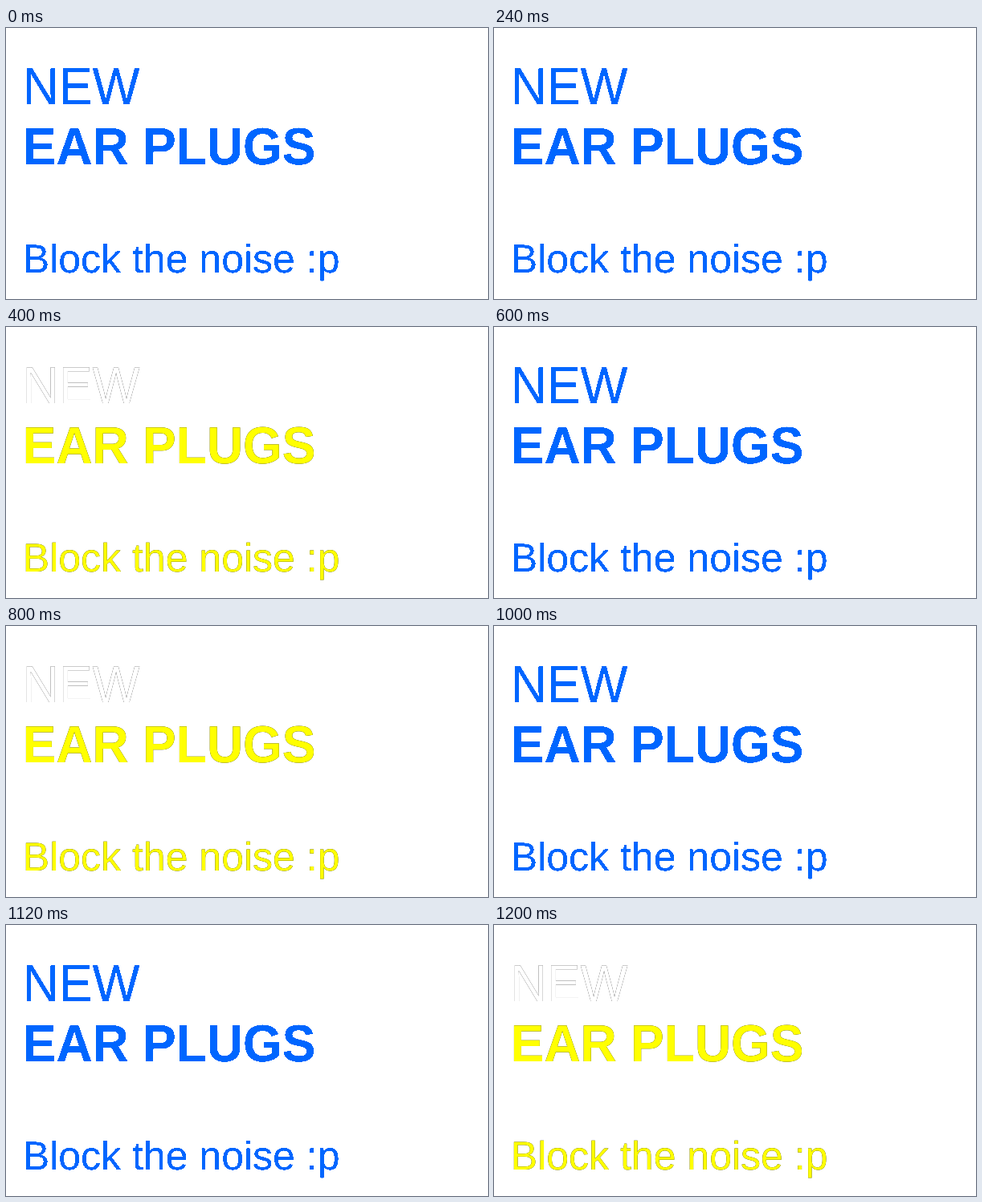
Recreate the animation shown at these times as an HTML page. Size 600x338 px, loop 1400 ms.

```html
<!DOCTYPE html>
<html lang="en">
<head>
<meta charset="utf-8">
<title>Ear plugs</title>
<style>
  html, body { margin: 0; width: 100%; height: 100%; overflow: hidden; background: #fff; }
  svg { display: block; }
  text {
    font-family: "Liberation Sans", Arial, sans-serif;
    font-kerning: none;
    text-rendering: geometricPrecision;
    fill: var(--copy);
  }
  .big { font-size: 62.5px; }
  .bold { font-weight: bold; }
  .small { font-size: 50px; }
  .new { fill: var(--new); }
  #face { --new: #06f; --copy: #06f; filter: url(#solid); }
  #edge { --new: #000; --copy: #000; visibility: hidden; }
  .flash #face { --new: #fff; --copy: #ff0; filter: none; }
  .flash #edge { visibility: visible; }
</style>
</head>
<body>
<svg id="stage" width="600" height="338" viewBox="0 0 600 338">
  <defs>
    <!-- Hard glyph edges for the blue pose -->
    <filter id="solid" filterUnits="userSpaceOnUse" x="0" y="0" width="600" height="338" color-interpolation-filters="sRGB">
      <feComponentTransfer><feFuncA type="linear" slope="20" intercept="-7"/></feComponentTransfer>
    </filter>
    <g id="words" transform="translate(20.8 0)">
      <g transform="translate(0 95) scale(1 1.04)"><text class="big new">NEW</text></g>
      <g transform="translate(0 170) scale(1 1.04)"><text class="big bold">EAR PLUGS</text></g>
      <text class="small" y="305">Block the noise :p</text>
    </g>
  </defs>
  <!-- Black copy below: its soft edge shows as a thin rim around the bright text -->
  <use id="edge" href="#words"/>
  <use id="face" href="#words"/>
</svg>
<script>
  const stage = document.getElementById("stage");
  const LOOP = 1400, BEAT = 200;

  function draw(now) {
    const beat = Math.floor(now % LOOP / BEAT);
    // The first blue pose holds for two beats, then the colours alternate.
    stage.classList.toggle("flash", beat > 0 && beat % 2 === 0);
    requestAnimationFrame(draw);
  }
  draw(performance.now());
</script>
</body>
</html>
```
